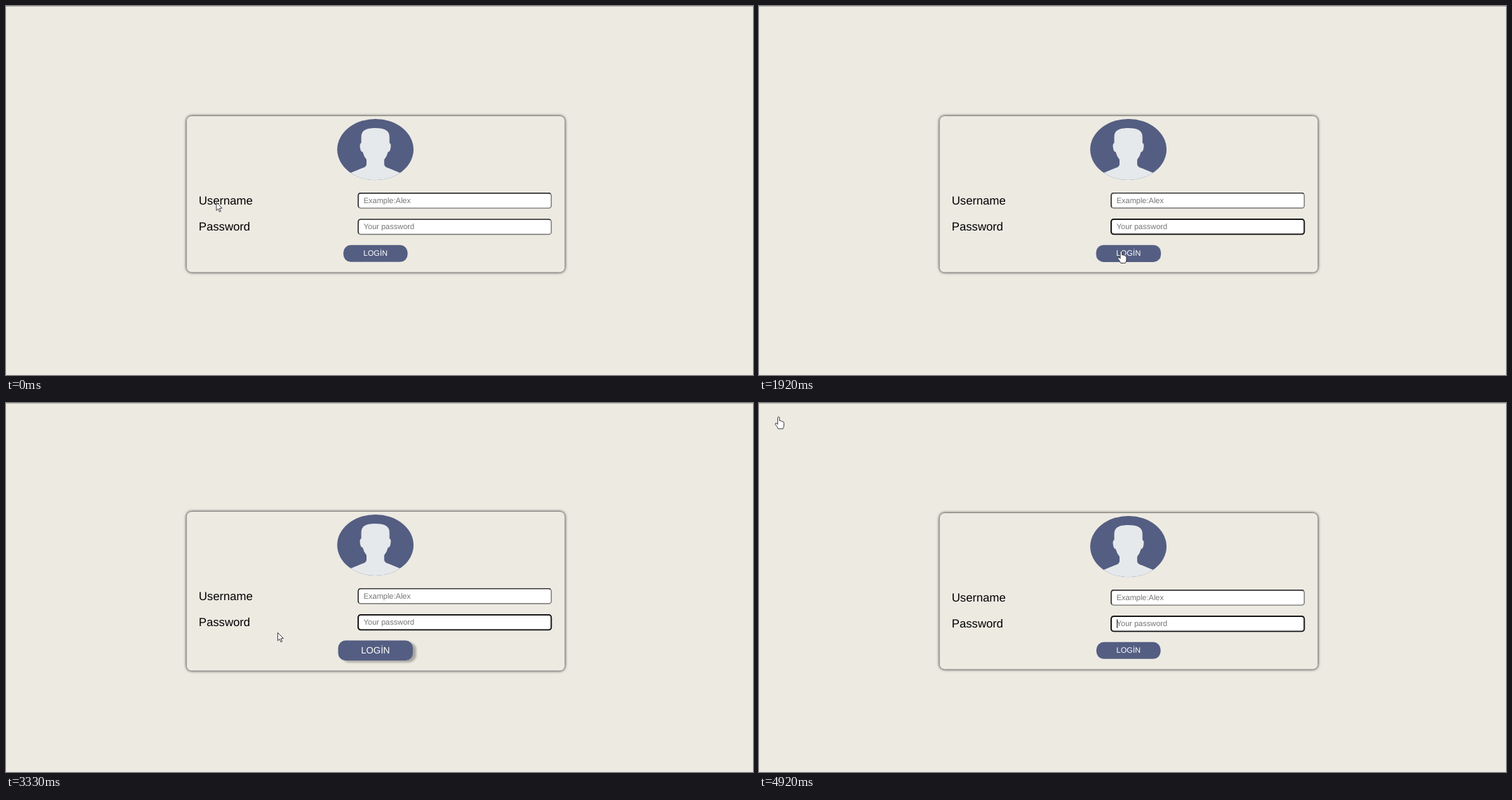
Animation, 1065 px wide and 526 px high, one loop 5010 ms. Source, as an HTML page:

```html
<!DOCTYPE html>
<html lang="en">
<head>
<meta charset="utf-8">
<title>Login form</title>
<style>
  html, body { margin: 0; width: 100%; height: 100%; overflow: hidden; background: #edeae2; }
  svg { display: block; width: 100vw; height: 100vh; }
  text { font-family: Arial, "Liberation Sans", sans-serif; text-rendering: geometricPrecision; }
  .label { font-size: 16.7px; }
  .hint { font-size: 11px; fill: #757575; }
  .edge { fill: none; stroke: #2e2e2e; stroke-width: 1.4; }
  .ring { fill: none; stroke: #101010; stroke-width: 1.7; }
  .cursor { fill: #fff; stroke: #2c2c34; stroke-width: .9; stroke-linejoin: round; }
</style>
</head>
<body>
<svg viewBox="0 0 1065 526">
  <defs>
    <filter id="glow" x="-5%" y="-10%" width="110%" height="120%"><feGaussianBlur stdDeviation="2.3"/></filter>
    <filter id="soft" x="-10%" y="-30%" width="120%" height="160%"><feGaussianBlur stdDeviation="1.5"/></filter>
    <clipPath id="oval"><ellipse cx="526.6" cy="204.6" rx="54.4" ry="43.6"/></clipPath>
    <path id="half" d="M527 174 C512 174 506.5 178 506.5 187 V195 Q504.5 196 504.5 199 Q505 208 508.5 208
      Q510 214 514 219 V226 Q513 230 508 231 L491 238 V250 H527 Z"/>
    <g id="field">
      <rect x="502.2" y="266.7" width="275.2" height="21.4" rx="3.6" fill="#fff" stroke="#767676" stroke-width="1.4"/>
      <path class="edge" d="M503.2 287 Q502.2 286 502.2 284.5 V270.3 Q502.2 266.7 505.8 266.7 H773.8 Q775.5 266.7 776.4 267.7"/>
    </g>
    <rect id="ring" class="ring" x="502.2" y="266.7" width="275.2" height="21.4" rx="3.6"/>
    <rect id="bar" x="510.2" y="271" width="1" height="12.4"/>
  </defs>

  <rect width="1065" height="526" fill="#edeae2"/>
  <rect width="1065" height="1" fill="#b5b3ae"/>

  <rect class="panel" x="257.6" width="539" rx="7" filter="url(#glow)"/>
  <rect class="panel" x="257.6" width="539" rx="7" fill="#edeae2"/>

  <g id="content">
    <g clip-path="url(#oval)">
      <rect x="470" y="160" width="114" height="90" fill="#545e82"/>
      <g fill="#e6e9ec">
        <use href="#half"/>
        <use href="#half" transform="translate(1053.2 0) scale(-1 1)"/>
      </g>
    </g>
    <text class="label" x="274.8" y="283">Username</text>
    <text class="label" x="274.8" y="320.4">Password</text>
    <use href="#field"/>
    <text class="hint" x="509.7" y="281.2">Example:Alex</text>
    <use id="userRing" href="#ring"/>
    <use id="userBar" href="#bar"/>
    <g transform="translate(0 37.4)">
      <use href="#field"/>
      <text class="hint" x="509.7" y="281">Your password</text>
      <use id="passRing" href="#ring"/>
      <use id="passBar" href="#bar"/>
    </g>
  </g>

  <rect id="shade" class="button" rx="10.5" filter="url(#soft)"/>
  <rect class="button" rx="10.5" fill="#545e82"/>
  <text id="caption" x="526.8" text-anchor="middle" fill="#fff">LOGİN</text>

  <path id="arrow" class="cursor" d="M0 0 V11.5 L2.6 9 L4.4 13.4 L6.2 12.6 L4.4 8.4 L8 8.2 Z"/>
  <path id="hand" class="cursor" d="M-1.3 1.3 Q0 -.6 1.3 1.3 V6 Q3 5.2 3.8 6.6 Q5.4 6 6 7.6 Q7.6 7.4 7.6 9 V13
    Q7.4 15.5 6 17.5 H-.5 Q-2 14.5 -4.8 11 Q-4.8 8.8 -3 9.6 L-1.3 11 Z"/>
</svg>
<script>
  const LOOP = 5010, STEP = 1000 / 12, BLINK = 530;
  const USER_FOCUS = 165, PASS_FOCUS = 1330;
  const HOVER_IN = 1900, HOVER_OUT = 3130, HOVER_TIME = 500;

  // time, x, y of the pointer's hot spot
  const PATH = [
    [0, 300, 280], [167, 300, 281], [417, 301, 288], [667, 305, 309], [750, 330, 319],
    [1083, 328, 316], [1500, 332, 317], [1667, 395, 331], [1917, 516.5, 349],
    [2083, 527, 355], [3000, 527, 355], [3083, 514, 352], [3167, 452, 342],
    [3417, 355, 320], [3667, 322.5, 312], [4167, 140, 151], [4583, 18, 39],
    [4750, 21, 34], [4833, 25, 27], [4917, 28, 19.3]
  ];

  const $ = id => document.getElementById(id);
  const all = name => document.querySelectorAll(name);
  const clamp = v => Math.max(0, Math.min(1, v));
  const show = (id, on) => $(id).setAttribute("visibility", on ? "visible" : "hidden");
  const set = (el, attrs) => {
    for (const key in attrs) el.setAttribute(key, attrs[key]);
  };

  function pointer(t) {
    const i = PATH.findIndex(p => p[0] > t);
    if (i < 0) return PATH[PATH.length - 1].slice(1);
    const [t0, x0, y0] = PATH[i - 1], [t1, x1, y1] = PATH[i];
    const k = (t - t0) / (t1 - t0);
    return [x0 + (x1 - x0) * k, y0 + (y1 - y0) * k];
  }

  const caretOn = age => age >= 0 && Math.floor(age / BLINK) % 2 === 0;

  function draw(t) {
    const grow = clamp((t - HOVER_IN) / HOVER_TIME) - clamp((t - HOVER_OUT) / HOVER_TIME);
    const lift = 3.5 * grow;

    all(".panel").forEach(el => set(el, { y: 157 - lift, height: 222.4 + 2 * lift }));
    set($("content"), { transform: `translate(0 ${-lift})` });

    const w = 91.5 + 25.4 * grow, h = 24 + 7.5 * grow;
    all(".button").forEach(el => set(el, { x: 526.8 - w / 2, y: 352.8 - h / 2, width: w, height: h }));
    set($("shade"), { transform: `translate(${8 * grow} ${4.5 * grow})`, opacity: 0.48 * grow });

    const size = 11.1 + 3.6 * grow;
    set($("caption"), { "font-size": size, y: 352.4 + 0.36 * size });

    const inPass = t >= PASS_FOCUS, inUser = t >= USER_FOCUS && !inPass;
    show("userRing", inUser);
    show("passRing", inPass);
    show("userBar", inUser && caretOn(t - USER_FOCUS));
    show("passBar", inPass && caretOn(t - PASS_FOCUS));

    const [x, y] = pointer(t);
    const hand = (t >= HOVER_IN && t < HOVER_OUT) || t > 4800;
    show("hand", hand);
    show("arrow", !hand);
    set($(hand ? "hand" : "arrow"), { transform: `translate(${x} ${y})` });
  }

  const start = performance.now();
  function tick() {
    const t = (performance.now() - start) % LOOP;
    draw(Math.min(59, Math.floor((t + 4) / STEP)) * STEP);
    requestAnimationFrame(tick);
  }
  tick();
</script>
</body>
</html>
```
